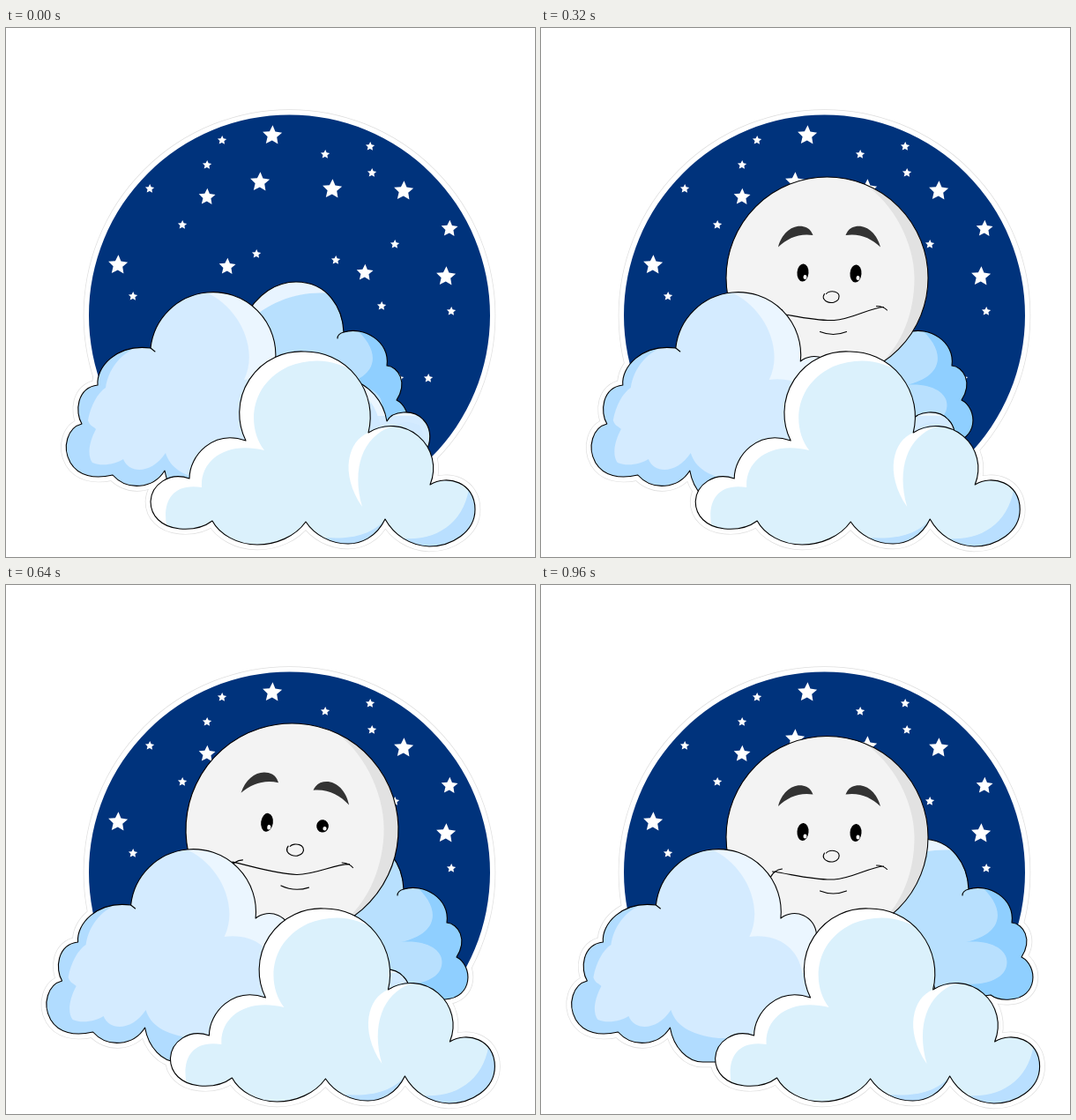
Write an HTML page with a canvas that moves like this. It is 600 by 600 pixels and loops after 1000 ms.

```html
<!DOCTYPE html>
<html lang="en">
<head>
<meta charset="utf-8">
<title>Moonrise</title>
<style>
html, body { margin: 0; width: 100%; height: 100%; overflow: hidden; background: #fff; }
canvas { display: block; width: 600px; height: 600px; }
</style>
</head>
<body>
<canvas id="stage" width="600" height="600"></canvas>
<script>
const g = document.getElementById('stage').getContext('2d');
const path = d => new Path2D(d);

const sky = path('M94 326A227.5 227.5 0 0 1 549 326A227.5 227.5 0 0 1 94 326Z');

// Each cloud: outline, base colour, patches clipped to it, extra ink line, speed in px per loop step
const back = {
  shape: path('M270 330C285 300 308 288 329 288C365 288 382 318 383 345C405 338 436 355 432 383C445 384 456 402 443 422C462 432 462 468 430 470C420 471 412 468 408 465L300 480Z'),
  base: '#b8e0fe',
  patches: [
    ['#e8f4ff', path('M265 342C295 311 330 298 366 301L366 280L265 280Z')],
    ['#8fcfff', path('M395 340C425 365 425 395 380 405C410 402 430 415 426 432C422 450 395 455 370 452L370 490L480 490L480 340Z')]
  ],
  ink: path('M383 345Q376 347 376 352'),
  step: 4.25
};
const left = {
  shape: path('M164 363A71 71 0 0 1 228 300A71 71 0 0 1 305.5 378A25 25 0 0 1 346 396L390 398A60 60 0 0 1 432 446C438 434 462 432 473 444C481 452 483 464 478 477L460 520L300 541L217 541C200 541 184 525 180 502A37 37 0 0 1 121 507C100 512 82 508 73 493C63 475 70 453 86 449C78 436 80 408 104 405C102 385 125 358 164 363Z'),
  base: '#b1dcff',
  patches: [
    ['#d4ebff', path('M152 360C128 370 116 388 113 408C104 414 96 428 93 445C95 452 100 452 102 455C94 470 92 485 98 493C110 498 125 494 133 489C140 506 165 506 181 482C186 498 200 510 235 514L520 514L520 290L152 290Z')],
    ['#ebf6ff', path('M222 298C262 312 288 362 270 399C300 395 325 410 330 440L520 440L520 298Z')],
    ['#d0e9ff', path('M398 410Q422 424 426 460L432 460Q446 440 470 451L485 500L398 500Z')]
  ],
  ink: path('M164 363L169 367'),
  step: -1.4
};
const front = {
  shape: path('M208 511C208 485 235 455 272 468A70 70 0 0 1 338 367A74 74 0 0 1 411 459A48 48 0 0 1 481 518C500 506 532 515 532 546C532 572 505 588 480 588C458 587 440 575 430 557C420 578 402 585 388 585C368 585 350 575 340 560C328 577 306 586 285 586C262 586 242 574 234 559C222 568 208 569 197 568C176 566 164 553 164 537C165 518 185 503 208 511Z'),
  base: '#fff',
  patches: [
    ['#dbf1fc', path('M184 572C176 545 183 515 222 521C220 490 250 468 293 479C274 455 274 406 320 384C345 374 375 374 400 394L425 440L560 440L560 600L184 600Z')],
    ['#fff', path('M411 457L437 452C404 464 392 500 404 543C378 505 388 468 411 459Z')],
    ['#b9dfff', path('M526 515C522 560 490 582 450 579L470 600L545 600L545 515Z')],
    ['#b9dfff', path('M431 556C415 576 390 580 362 578L380 595L425 590Z')]
  ],
  step: 1.4
};

const stars = [
  [11.6, [302, 121, 288, 174, 370, 182, 451, 184, 127, 268, 499, 281]],
  [9.9, [228, 191, 251, 270, 407, 277, 503, 227]],
  [5.4, [245, 127, 228, 155, 163, 182, 200, 223, 144, 304, 284, 256, 362, 143, 413, 134,
         415, 164, 441, 245, 374, 263, 426, 315, 505, 321, 479, 397, 446, 397]]
];

const shade = path('M42 -106.5C75 -85 99 -40 99 0C99 40 85 75 60 97.5A114.5 114.5 0 0 0 42 -106.5Z');
const brow = path('M-55.5 -35C-51 -53 -36 -63 -23 -57C-19 -55 -17 -51 -16 -48.5C-32 -51 -45 -45 -55.5 -35Z');
const smile = path('M-3 18C-9 27 8 32 13 24C17 15 3 13 -1 18M-62 39C-40 42 -15 49 8 48C28 47 48 34 64 33M-64.5 46Q-60 37 -51 36M56 32Q64 32 68 36.5M-8 61Q7 67 22 61');

// time, centre y, scale, tilt in degrees, squint
const poses = [
  [0, 466, .8, 30, 0], [160, 367, .9, 16, 0], [320, 283.5, 1, 0, 0],
  [400, 269, 1.03, -4, 0], [480, 269, 1.07, -1, .6], [560, 276, 1.07, 2.5, 1],
  [720, 279, 1.035, 5, 1], [840, 274, 1, -3, 0], [960, 286, 1, 0, 0]
];

function poseAt(t) {
  const i = Math.max(1, poses.findIndex(p => p[0] >= t));
  const a = poses[i - 1], b = poses[i], k = (t - a[0]) / (b[0] - a[0]);
  return a.map((v, n) => v + (b[n] - v) * k);
}

function fill(color, shape) {
  g.fillStyle = color;
  g.fill(shape);
}

function ink(shape, color = '#000', width = 1.1) {
  g.strokeStyle = color;
  g.lineWidth = width;
  g.stroke(shape);
}

function shifted(dx, draw) {
  g.save();
  g.translate(dx, 0);
  draw();
  g.restore();
}

function oval(color, x, y, rx, ry) {
  const p = new Path2D();
  p.ellipse(x, y, rx, ry, .08, 0, 7);
  fill(color, p);
}

function drawStar(x, y, r) {
  g.beginPath();
  for (let i = 0; i < 10; i++) {
    const a = i * Math.PI / 5 - Math.PI / 2 + .04, d = i % 2 ? r * .48 : r;
    g.lineTo(x + d * Math.cos(a), y + r * .07 + d * Math.sin(a));
  }
  g.fillStyle = '#fff';
  g.fill();
}

function drawCloud(cloud, frame) {
  shifted(cloud.step * frame, () => {
    g.save();
    g.clip(cloud.shape);
    fill(cloud.base, cloud.shape);
    cloud.patches.forEach(p => fill(...p));
    g.restore();
    ink(cloud.shape);
    if (cloud.ink) ink(cloud.ink);
  });
}

function drawEye(x, y, squint) {
  oval('#000', x, y - squint, 6.5, 10 - 3.2 * squint);
  oval('#fff', x + 2.5, y + 5 - 3.5 * squint, 2, 2.6 - .5 * squint);
}

function drawMoon(t) {
  const [, y, scale, tilt, squint] = poseAt(t);
  g.save();
  g.translate(324.5, y);
  g.rotate(tilt * Math.PI / 180);
  g.scale(scale, scale);
  const disc = new Path2D();
  disc.arc(0, 0, 114.5, 0, 7);
  fill('#f3f3f3', disc);
  fill('#e2e2e2', shade);
  ink(disc);
  g.save();
  g.translate(-2 * squint, -squint);
  fill('#333', brow);
  g.restore();
  g.save();
  g.translate(5 - squint, 4.5 * squint);
  g.scale(-1, 1);
  fill('#333', brow);
  g.restore();
  drawEye(-27.5, -6, 0);
  drawEye(32.5, -5, squint);
  ink(smile);
  g.restore();
}

function draw(now) {
  const frame = Math.floor(now % 1000 / 40);
  g.fillStyle = '#fff';
  g.fillRect(0, 0, 600, 600);
  g.lineJoin = g.lineCap = 'round';

  // sticker border around everything
  for (const [color, width] of [['#dedede', 12.6], ['#fff', 11.2]]) {
    ink(sky, color, width);
    for (const c of [back, left, front])
      shifted(c.step * frame, () => ink(c.shape, color, width));
  }

  fill('#00337c', sky);
  for (const [r, spots] of stars)
    for (let i = 0; i < spots.length; i += 2) drawStar(spots[i], spots[i + 1], r);
  drawCloud(back, frame);
  drawMoon(frame * 40);
  drawCloud(left, frame);
  drawCloud(front, frame);
  requestAnimationFrame(() => draw(performance.now()));
}
draw(0);
</script>
</body>
</html>
```
